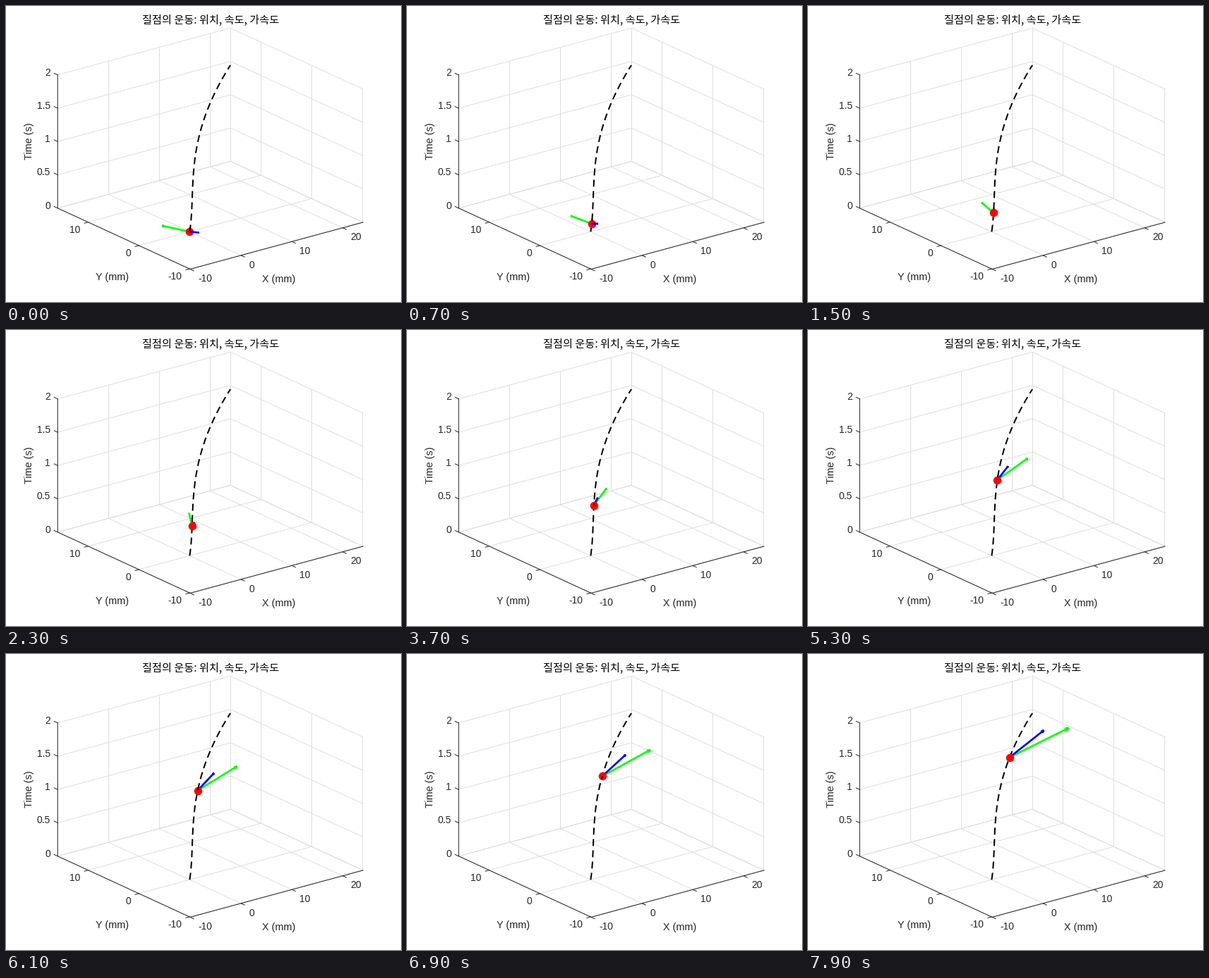
A matplotlib script that plays this animation: 560x420 px, repeating every 8 s.

```python
import numpy as np
import matplotlib.pyplot as plt
from matplotlib.animation import FuncAnimation

W, H, DPI = 560, 420, 100
FRAMES, INTERVAL = 80, 100
PX = 72 / DPI                      # points per pixel

INK, GRID = "#262626", "#dedede"
LIMITS = np.array([[-10, 24], [-10.125, 16], [0, 2]])
RANGES = np.ptp(LIMITS, axis=1)
X_TICKS, Y_TICKS = [-10, 0, 10, 20], [-10, 0, 10]
Z_TICKS = [0, 0.5, 1, 1.5, 2]

# Orthographic view of a unit cube, stretched to the axes area
AZ, EL = np.radians(37.5), np.radians(30)
SX, SY = 308.8, 218.3
CORNER = np.array([261.2, 373.4])
BASIS = np.array([
    [SX * np.cos(AZ), -SY * np.sin(AZ) * np.sin(EL)],
    [-SX * np.sin(AZ), -SY * np.cos(AZ) * np.sin(EL)],
    [0, -SY * np.cos(EL)],
])
VIEWER = np.array([-np.sin(AZ) * np.cos(EL), -np.cos(AZ) * np.cos(EL), np.sin(EL)])

ARROW_SCALE = 0.9
DASH, GAP = 10, 6
TIMES = np.linspace(0, 2, 100)


def flat(vector):
    """Stage displacement of a vector in data units."""
    return vector / RANGES @ BASIS


def nearness(vector):
    """How far a vector in data units leads towards the viewer."""
    return vector / RANGES @ VIEWER


def project(point):
    return CORNER + flat(np.asarray(point, float) - LIMITS[:, 0])


def position(t):
    return np.stack([2 * t**3 - t**2 + t, 2 * t**2 - t, t], axis=-1)


def velocity(t):
    return np.array([6 * t**2 - 2 * t + 1, 4 * t - 1, 0])


def acceleration(t):
    return np.array([12 * t - 2, 4, 0])


fig = plt.figure(figsize=(W / DPI, H / DPI), dpi=DPI, facecolor="white")
ax = fig.add_axes([0, 0, 1, 1])
ax.set_xlim(0, W)
ax.set_ylim(H, 0)
ax.axis("off")


def line(points, color, width=1, **style):
    points = np.asarray(points, float)
    return ax.plot(points[:, 0], points[:, 1], color=color, lw=width * PX, **style)[0]


def grid_line(*corners):
    line([project(c) for c in corners], GRID, zorder=1)


def label(x, y, text, size, ha="center", color=INK, font="Liberation Sans", **style):
    ax.text(x, y, text, fontsize=size * PX, ha=ha, va="baseline",
            color=color, family=font, **style)


def tick(at, direction, text, dx, dy, ha):
    p = project(at)
    line([p, p + direction / np.hypot(*direction) * 5.5], INK, zorder=2)
    label(p[0] + dx, p[1] + dy + 4.9, text, 13.9, ha)


def draw_axes():
    (x0, x1), (y0, y1), (z0, z1) = LIMITS
    for x in X_TICKS + [x1]:
        grid_line((x, y0, z0), (x, y1, z0))
        grid_line((x, y1, z0), (x, y1, z1))
    for y in Y_TICKS + [y1]:
        grid_line((x0, y, z0), (x1, y, z0))
        grid_line((x1, y, z0), (x1, y, z1))
    for z in Z_TICKS:
        grid_line((x0, y1, z), (x1, y1, z), (x1, y0, z))

    edge = [(x0, y1, z1), (x0, y1, z0), (x0, y0, z0), (x1, y0, z0)]
    line([project(p) for p in edge], INK, zorder=2)
    for x in X_TICKS:
        tick((x, y0, z0), -BASIS[1], str(x), 10.8, 12.8, "left")
    for y in Y_TICKS:
        tick((x0, y, z0), -BASIS[0], str(y), -10.8, 10.4, "right")
    for z in Z_TICKS:
        tick((x0, y1, z), BASIS[1], f"{z:g}", -10.2, -4, "right")

    label(386.8, 392.3, "X (mm)", 14.4)
    label(150.8, 388.5, "Y (mm)", 14.4)
    label(36.8, 192, "Time (s)", 14.4, rotation=90, rotation_mode="anchor")
    label(290, 25, "질점의 운동: 위치, 속도, 가속도", 15.2,
          color="black", font="Noto Sans CJK JP")


def dashed_path():
    """Finely sampled path in space, with its dash mask."""
    space = position(np.linspace(0, 2, 2000))
    steps = np.hypot(*np.diff(project(space), axis=0).T)
    length = np.concatenate([[0], np.cumsum(steps)])
    return space, length % (DASH + GAP) < DASH


def masked(points, keep):
    return np.where(keep[:, None], points, np.nan)


def arrow_points(start, vector):
    """Shaft and small open head as one polyline."""
    shift = flat(vector) * ARROW_SCALE
    normal = np.array([-shift[1], shift[0]])
    tip = start + shift
    barbs = [tip - 0.06 * shift + side * 0.02 * normal for side in (1, -1)]
    return np.array([start, tip, barbs[0], tip, barbs[1]])


draw_axes()
path, on_dash = dashed_path()
path_stage = project(path)
path_style = dict(color="black", width=2, solid_capstyle="butt")
line(masked(path_stage, on_dash), zorder=3, **path_style)
near_path = line([(0, 0)], zorder=8, **path_style)

arrow_style = dict(width=2.67, solid_capstyle="butt", solid_joinstyle="bevel")
vel_line = line([(0, 0)], "#0000ff", **arrow_style)
acc_line = line([(0, 0)], "#00ff00", zorder=4, **arrow_style)
dot, = ax.plot([], [], "o", color="#ff0000", ms=11.5 * PX, mew=0, zorder=6)


def update(frame):
    # The motion holds for one frame after the fifth step
    t = TIMES[frame if frame < 6 else frame - 1]
    here = position(t)
    p = project(here)
    v = velocity(t)
    dot.set_data([p[0]], [p[1]])
    vel_line.set_data(*arrow_points(p, v).T)
    acc_line.set_data(*arrow_points(p, acceleration(t)).T)
    # Whatever lies nearer to the viewer than the dot covers it
    vel_line.set_zorder(7 if nearness(v) > 0 else 5)
    nearer = nearness(path - here) > 0
    close = np.hypot(*(path_stage - p).T) < 7
    near_path.set_data(*masked(path_stage, on_dash & nearer & close).T)
    return vel_line, acc_line, near_path, dot


anim = FuncAnimation(fig, update, frames=FRAMES, interval=INTERVAL,
                     init_func=lambda: update(0), repeat=True, repeat_delay=0)
plt.show()
```
